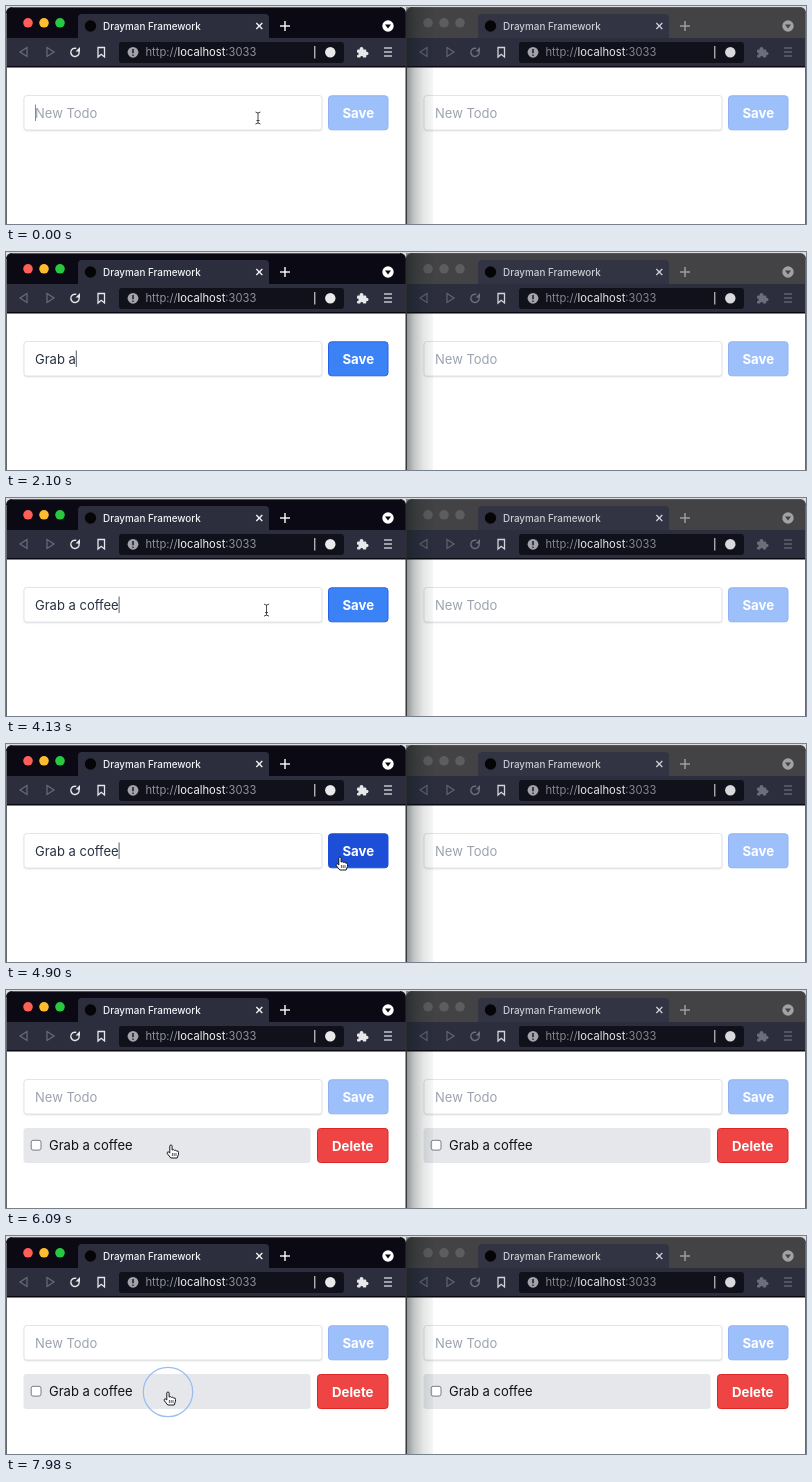
Write an HTML page with a canvas that moves like this. It is 800x218 px and loops after 8 s.

```html
<!DOCTYPE html>
<html lang="en">
<head>
<meta charset="utf-8">
<title>Todo in two windows</title>
<style>
html, body { margin: 0; width: 100%; height: 100%; overflow: hidden; background: #fff; }
canvas { display: block; width: 800px; height: 218px; }
</style>
</head>
<body>
<canvas id="stage"></canvas>
<script>
const W = 800, H = 218, LOOP = 8000, STEP = 70;
const canvas = document.getElementById('stage');
const ctx = canvas.getContext('2d');
const dpr = Math.max(1, window.devicePixelRatio || 1);
canvas.width = W * dpr;
canvas.height = H * dpr;

const FONT = 'Inter, "Open Sans", sans-serif';
const TODO = 'Grab a coffee';
const KEYS = [700, 910, 1120, 1400, 1680, 1960, 2170, 2450, 2660, 2940, 3220, 3430, 3640];
const LAST_KEY = KEYS[KEYS.length - 1];
const MOUSE_BACK = 3990, SAVED = 5250, CHECKED = 6720, UNCHECKED = 7840;
const CLICKS = [5180, 6720, 7770];
const PATH = [[0, 252, 112], [MOUSE_BACK, 252, 112], [4690, 334, 113],
  [5460, 334, 113], [6020, 165, 155], [6300, 165, 155], [6580, 162, 156]];

const LIGHT = {
  bar: '#0b0a14', tab: '#2c2e3e', tool: '#2c2e3e', url: '#10111a', title: '#f4f4f6',
  icon: '#e8e8ec', soft: '#e8e8ec', dim: '#6a6c7a', host: '#f2f2f4', faint: '#8e909b',
  badge: '#e9e9ec', lights: ['#ff5f57', '#febc2e', '#28c840'], plus: '#ffffff'
};
const DARK = {
  bar: '#434345', tab: '#323443', tool: '#2c2e3e', url: '#10111a', title: '#cccdd2',
  icon: '#d4d5da', soft: '#6c6e7b', dim: '#62646f', host: '#e6e6e9', faint: '#83858f',
  badge: '#d9d9dd', lights: ['#5d5d5f', '#5d5d5f', '#5d5d5f'], plus: '#a2a2a6'
};

const BLUE = { fill: '#3b82f6', edge: '#2563eb' };
const PRESSED = { fill: '#1d4ed8', edge: '#1d4ed8' };
const PALE = { fill: '#9dc0fb', edge: '#92b1f5' };
const RED = { fill: '#ef4444', edge: '#dc2626' };

function box(x, y, w, h, r, fill, stroke) {
  ctx.beginPath();
  ctx.roundRect(x, y, w, h, r);
  if (fill) { ctx.fillStyle = fill; ctx.fill(); }
  if (stroke) { ctx.strokeStyle = stroke; ctx.lineWidth = 1; ctx.stroke(); }
}

function dot(x, y, r, fill) {
  ctx.beginPath();
  ctx.arc(x, y, r, 0, Math.PI * 2);
  ctx.fillStyle = fill;
  ctx.fill();
}

function line(points, color, width = 1, close = false) {
  ctx.beginPath();
  points.forEach(([x, y], i) => i ? ctx.lineTo(x, y) : ctx.moveTo(x, y));
  if (close) ctx.closePath();
  ctx.strokeStyle = color;
  ctx.lineWidth = width;
  ctx.stroke();
}

function text(str, x, y, color, size, weight = 400, align = 'left') {
  ctx.font = `${weight} ${size}px ${FONT}`;
  ctx.textAlign = align;
  ctx.fillStyle = color;
  ctx.fillText(str, x, y);
  return ctx.measureText(str).width;
}

function drawTabBar(c) {
  box(0, 1, 400, 40, [6, 6, 0, 0], c.bar);
  line([[6, 1.5], [394, 1.5]], '#55565c');
  c.lights.forEach((color, i) => dot(22 + i * 16, 16.8, 4.8, color));
  box(72, 8, 191, 26, [4, 4, 0, 0], c.tab);
  dot(84.5, 20, 5.7, '#050507');
  text('Drayman Framework', 97, 23.5, c.title, 9.9, 500);
  line([[250.3, 17], [256.3, 23]], c.title, 1.3);
  line([[256.3, 17], [250.3, 23]], c.title, 1.3);
  line([[274, 20], [284, 20]], c.plus, 1.4);
  line([[279, 15], [279, 25]], c.plus, 1.4);
  dot(382, 20, 5.7, c.plus);
  ctx.beginPath();
  ctx.moveTo(379, 18.5);
  ctx.lineTo(385, 18.5);
  ctx.lineTo(382, 22.5);
  ctx.fillStyle = c.bar;
  ctx.fill();
}

function drawToolbar(c) {
  box(0, 32, 400, 29, 0, c.tool);
  line([[0, 60.75], [400, 60.75]], '#08070f', 1.5);
  line([[21, 41.5], [14, 46], [21, 50.5]], c.dim, 1.2, true);
  line([[41, 41.5], [48, 46], [41, 50.5]], c.dim, 1.2, true);

  ctx.beginPath();
  ctx.arc(69, 46.3, 4.1, -0.5, Math.PI * 1.6);
  ctx.strokeStyle = c.soft;
  ctx.lineWidth = 1.5;
  ctx.stroke();
  ctx.beginPath();
  ctx.moveTo(74, 41);
  ctx.lineTo(74, 45.5);
  ctx.lineTo(69.5, 45.5);
  ctx.fillStyle = c.soft;
  ctx.fill();
  line([[92, 41.5], [98.5, 41.5], [98.5, 51], [95.2, 48.3], [92, 51]], c.icon, 1.3, true);

  box(113, 36, 225, 21, 3, c.url);
  dot(127, 46.3, 5.4, '#a2a3ab');
  line([[127, 43], [127, 47.3]], c.url, 1.4);
  dot(127, 49.3, 0.8, c.url);
  let x = 139.5;
  x += text('http://', x, 50.2, c.faint, 11.2);
  x += text('localhost', x, 50.2, c.host, 11.2);
  text(':3033', x, 50.2, c.faint, 11.2);
  line([[308.8, 40], [308.8, 52.5]], c.host, 1);
  dot(324.3, 46.2, 5.2, c.badge);

  box(351, 43.5, 9.3, 8, 1, c.soft);
  dot(355.5, 42.8, 1.9, c.soft);
  dot(360.7, 47.5, 1.8, c.soft);
  dot(351.3, 47.8, 1.4, c.tool);
  dot(355.7, 51.4, 1.4, c.tool);
  for (const y of [42, 46, 50]) line([[378, y], [386, y]], c.soft, 1.2);
}

function button(x, y, w, label, color) {
  box(x + 0.5, y + 0.5, w - 1, 34, 3, color.fill, color.edge);
  text(label, x + w / 2, y + 22.5, '#fff', 13.2, 700, 'center');
}

function drawInput(value) {
  ctx.save();
  ctx.shadowColor = 'rgba(0,0,0,.14)';
  ctx.shadowBlur = 2 * dpr;
  ctx.shadowOffsetY = dpr;
  box(18, 89.5, 298, 34.5, 3, '#fff');
  ctx.restore();
  box(18, 89.5, 298, 34.5, 3, null, '#e3e5e9');
  return text(value || 'New Todo', 29, 111.5, value ? '#273140' : '#9ca3af', 13);
}

function drawItem(done) {
  box(17.5, 138, 287, 35, 3, done ? '#a7f3d0' : '#e5e7eb');
  if (done) {
    box(25, 150, 10.5, 10.5, 2, '#0b6ff5');
    line([[27.3, 155.4], [29.4, 157.7], [33.2, 152.6]], '#fff', 1.5);
  } else {
    box(25.2, 150.3, 9.8, 9.8, 2, '#fff', '#7b7c80');
  }
  const w = text(TODO, 43, 159.8, '#111', 13);
  if (done) line([[43, 155.5], [43 + w, 155.5]], '#111', 1);
  button(311, 138, 71.5, 'Delete', RED);
}

function drawWindow(c, s) {
  box(0, 40, 400, 178, 0, '#fff');
  drawTabBar(c);
  drawToolbar(c);
  const width = drawInput(s.value);
  button(322, 89.3, 60.5, 'Save', !s.value ? PALE : s.hover ? PRESSED : BLUE);
  if (s.caret) {
    const x = 29.5 + (s.value ? width : 0);
    line([[x, 98.5], [x, 115]], s.value ? '#555b66' : '#8a8a8a', 1);
  }
  if (s.saved) drawItem(s.done);
}

// Shadow of the front window over the left side of the back one
function drawShadow() {
  const page = ctx.createLinearGradient(400, 0, 427, 0);
  page.addColorStop(0, 'rgba(15,25,25,.48)');
  page.addColorStop(0.3, 'rgba(15,25,25,.25)');
  page.addColorStop(0.65, 'rgba(15,25,25,.11)');
  page.addColorStop(1, 'rgba(15,25,25,.04)');
  ctx.fillStyle = page;
  ctx.fillRect(400, 1, 27, 217);
}

function mouseAt(t) {
  let i = PATH.length - 1;
  while (PATH[i][0] > t) i--;
  const a = PATH[i], b = PATH[i + 1];
  if (!b) return { x: a[1], y: a[2] };
  const p = (t - a[0]) / (b[0] - a[0]);
  const e = p * p * (3 - 2 * p);
  return { x: a[1] + (b[1] - a[1]) * e, y: a[2] + (b[2] - a[2]) * e };
}

const inside = (m, x, y, w, h) => m.x >= x && m.x < x + w && m.y >= y && m.y < y + h;

function drawShape(m, d) {
  ctx.save();
  ctx.translate(m.x, m.y);
  const shape = new Path2D(d);
  ctx.lineJoin = 'round';
  ctx.fillStyle = '#fff';
  ctx.strokeStyle = '#16181c';
  ctx.lineWidth = 1;
  ctx.fill(shape);
  ctx.stroke(shape);
  ctx.restore();
}

function drawHand(m) {
  drawShape(m, 'M-1.2 1.2Q-1.2 0 0 0Q1.1 0 1.1 1.2V5Q2.8 4.2 3.5 5.4Q5 4.7 5.7 6Q7.5 5.6 7.5 7.4V9.3L6.2 13H-.2L-3.6 8.8Q-4.5 7.2-3 6.8Q-2.2 6.8-1.2 8Z');
  for (const x of [1.4, 3.2, 5]) line([[m.x + x, m.y + 8], [m.x + x, m.y + 11]], '#16181c', 0.7);
}

function drawBeam({ x, y }) {
  const parts = [
    [[x - 2.5, y - 6], [x, y - 5], [x + 2.5, y - 6]],
    [[x, y - 5], [x, y + 5]],
    [[x - 2.5, y + 6], [x, y + 5], [x + 2.5, y + 6]],
    [[x - 1.5, y + 2.5], [x + 1.5, y + 2.5]]
  ];
  for (const p of parts) line(p, '#333', 0.9);
}

function drawMouse(m, s) {
  if (s.saved && inside(m, 17.5, 138, 287, 35)) drawHand(m);
  else if (s.hover && !s.saved) drawHand(m);
  else if (inside(m, 18, 89, 298, 36)) drawBeam(m);
  else drawShape(m, 'M0 0V11L2.6 8.7L4.3 12.4L6 11.6L4.4 8H8Z');
}

function drawClicks(t) {
  for (const start of CLICKS) {
    const p = (t - start) / 350;
    if (p < 0 || p > 1) continue;
    const m = mouseAt(start);
    ctx.globalAlpha = Math.min(1, (1 - p) * 2.2);
    ctx.beginPath();
    ctx.arc(m.x, m.y, 26 - 20 * (1 - p) ** 3, 0, Math.PI * 2);
    ctx.strokeStyle = '#8bb8f0';
    ctx.lineWidth = 1.2;
    ctx.stroke();
    ctx.globalAlpha = 1;
  }
}

function stateAt(t) {
  const saved = t >= SAVED;
  const typed = KEYS.filter(k => k <= t).length;
  const typing = t >= KEYS[0] && t < LAST_KEY;
  const blink = typed ? t - LAST_KEY : t;
  return {
    saved,
    value: saved ? '' : TODO.slice(0, typed),
    hover: t >= MOUSE_BACK && inside(mouseAt(t), 322, 89, 61, 36),
    caret: t < CLICKS[0] && (typing || Math.floor(blink / 500) % 2 === 0),
    done: t >= CHECKED && t < UNCHECKED
  };
}

function draw(t) {
  ctx.setTransform(dpr, 0, 0, dpr, 0, 0);
  ctx.fillStyle = '#dcdcde';
  ctx.fillRect(0, 0, W, H);
  const s = stateAt(t);

  ctx.save();
  ctx.translate(400, 0);
  drawWindow(DARK, { saved: s.saved, done: s.done, value: '' });
  ctx.restore();
  drawShadow();

  drawWindow(LIGHT, s);
  line([[0.5, 7], [0.5, H]], '#66686c');
  line([[400.2, 6], [400.2, H]], '#2e3033', 1.4);
  line([[799.5, 7], [799.5, H]], '#66686c');

  drawClicks(t);
  if (t < KEYS[0] || t >= MOUSE_BACK) drawMouse(mouseAt(t), s);
}

const begin = performance.now();
function tick() {
  const t = (performance.now() - begin) % LOOP;
  draw(Math.floor(t / STEP) * STEP);
  requestAnimationFrame(tick);
}
tick();
</script>
</body>
</html>
```
